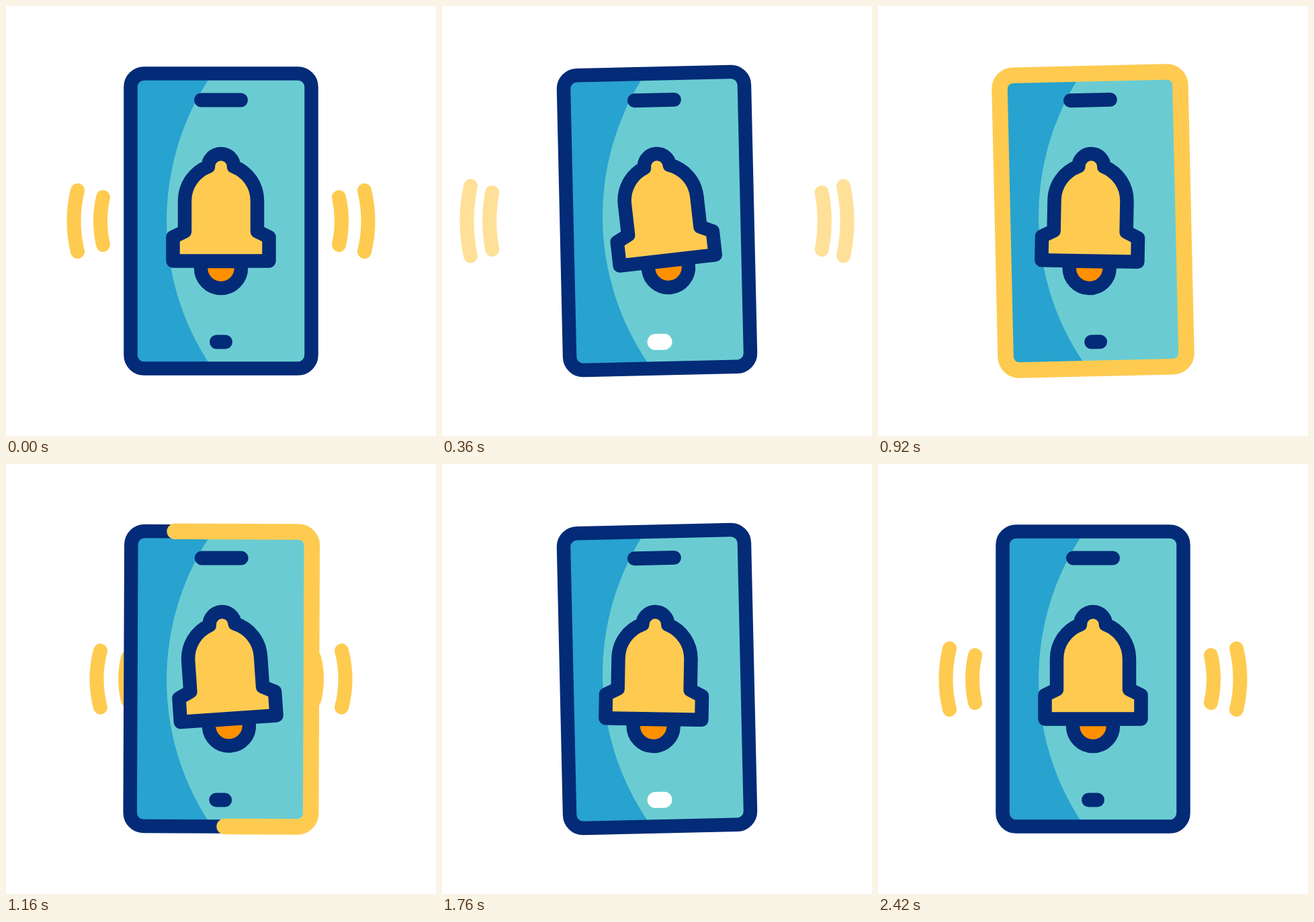
These frames come from a looping animation (640 by 640 pixels, 2600 ms). An HTML page:

```html
<!DOCTYPE html>
<html lang="en">
<head>
<meta charset="utf-8">
<title>Ringing phone</title>
<style>
  html, body { margin: 0; width: 100%; height: 100%; overflow: hidden; background: #fff; }
  svg { display: block; width: 100%; height: 100%; }
  path, rect { stroke-linecap: round; stroke-linejoin: round; }
</style>
</head>
<body>
<svg viewBox="0 0 640 640" fill="none" stroke="#032b77" stroke-width="20.5">
  <path id="waves" stroke="#fecb50" stroke-width="21"/>
  <g id="phone">
    <rect x="185.5" y="100.5" width="269" height="439" rx="20" fill="#6accd2" stroke="none"/>
    <path d="M190 110H301A387 387 0 0 0 301 530H190Z" fill="#28a2cf" stroke="none"/>
    <rect x="185.5" y="100.5" width="269" height="439" rx="20"/>
    <path d="M290.5 140H349.5" stroke-width="21"/>
    <path id="button" d="M313.5 500H326.5"/>
    <path id="trace" pathLength="1" stroke="#fecb50" stroke-width="23.5"
      d="M326 539.5H205.5a20 20 0 0 1 -20 -20V120.5a20 20 0 0 1 20 -20H434.5a20 20 0 0 1 20 20V519.5a20 20 0 0 1 -20 20Z"/>
    <g id="bell">
      <path d="M290 380V390A30 30 0 0 0 350 390V380Z" fill="#ff9000"/>
      <path fill="#fecb50" d="M301 239a19 19 0 0 1 38 0C360 247 374 267 374 290V335.5L391.5 344V379.5H248.5V344L266 335.5V290C266 267 280 247 301 239Z"/>
    </g>
  </g>
</svg>
<script>
const LOOP = 2600;
const [waves, phone, button, trace, bell] =
  ['waves', 'phone', 'button', 'trace', 'bell'].map(id => document.getElementById(id));

const clamp = v => Math.max(0, Math.min(1, v));
const progress = (t, from, to) => clamp((t - from) / (to - from));
const ease = u => (1 - Math.cos(Math.PI * u)) / 2;

// Eases out to a first extreme, swings between extremes, then settles at rest.
function swing(t, first, half, count, end) {
  const last = first + half * count;
  if (t < first) return ease(t / first);
  if (t < last) return Math.cos(Math.PI * (t - first) / half);
  return (count % 2 ? -1 : 1) * (1 - ease(progress(t, last, end)));
}

// Outward offset and opacity of the sound waves.
function wavePose(t) {
  if (t < 560) {
    const u = t / 560;
    return [89 * ease(u), 1 - u * u];
  }
  if (t < 960) return [0, 0];
  if (t < 1440) return [-80 + 110 * progress(t, 960, 1440), clamp((1410 - t) / 250)];
  if (t < 1900) return [0, 0];
  return [-90 * (1 - progress(t, 1900, 2420)) ** 2, 1];
}

function arcs(x, half, sag, shift) {
  const h = half + shift * 0.1;
  const left = x - shift, right = 640 - left;
  return [[left, -2 * sag], [right, 2 * sag]]
    .map(([px, bend]) => `M${px} ${320 - h}Q${px + bend} 320 ${px} ${320 + h}`).join('');
}

function draw(t) {
  const [shift, alpha] = wavePose(t);
  waves.setAttribute('d', arcs(106.5, 45.5, 5.5, shift) + arcs(144.5, 35.5, 4, shift * 1.09));
  waves.setAttribute('opacity', alpha);

  phone.setAttribute('transform', `rotate(${-1.3 * swing(t, 80, 70, 29, 2185)} 320 320)`);
  bell.setAttribute('transform', `rotate(${5.2 * swing(t, 155, 210, 9, 2200)} 320 220)`);

  const lit = Math.abs(t - 370) < 70 || Math.abs(t - 1770) < 70;
  button.setAttribute('stroke', lit ? '#fff' : '#032b77');
  button.setAttribute('stroke-width', lit ? 24 : 21);

  const head = progress(t, 420, 915), tail = progress(t, 925, 1445);
  trace.setAttribute('visibility', head > tail ? 'visible' : 'hidden');
  trace.setAttribute('stroke-dasharray', `${head - tail} 2`);
  trace.setAttribute('stroke-dashoffset', -tail);
}

const start = performance.now();
function tick() {
  draw((performance.now() - start) % LOOP);
  requestAnimationFrame(tick);
}
tick();
</script>
</body>
</html>
```
